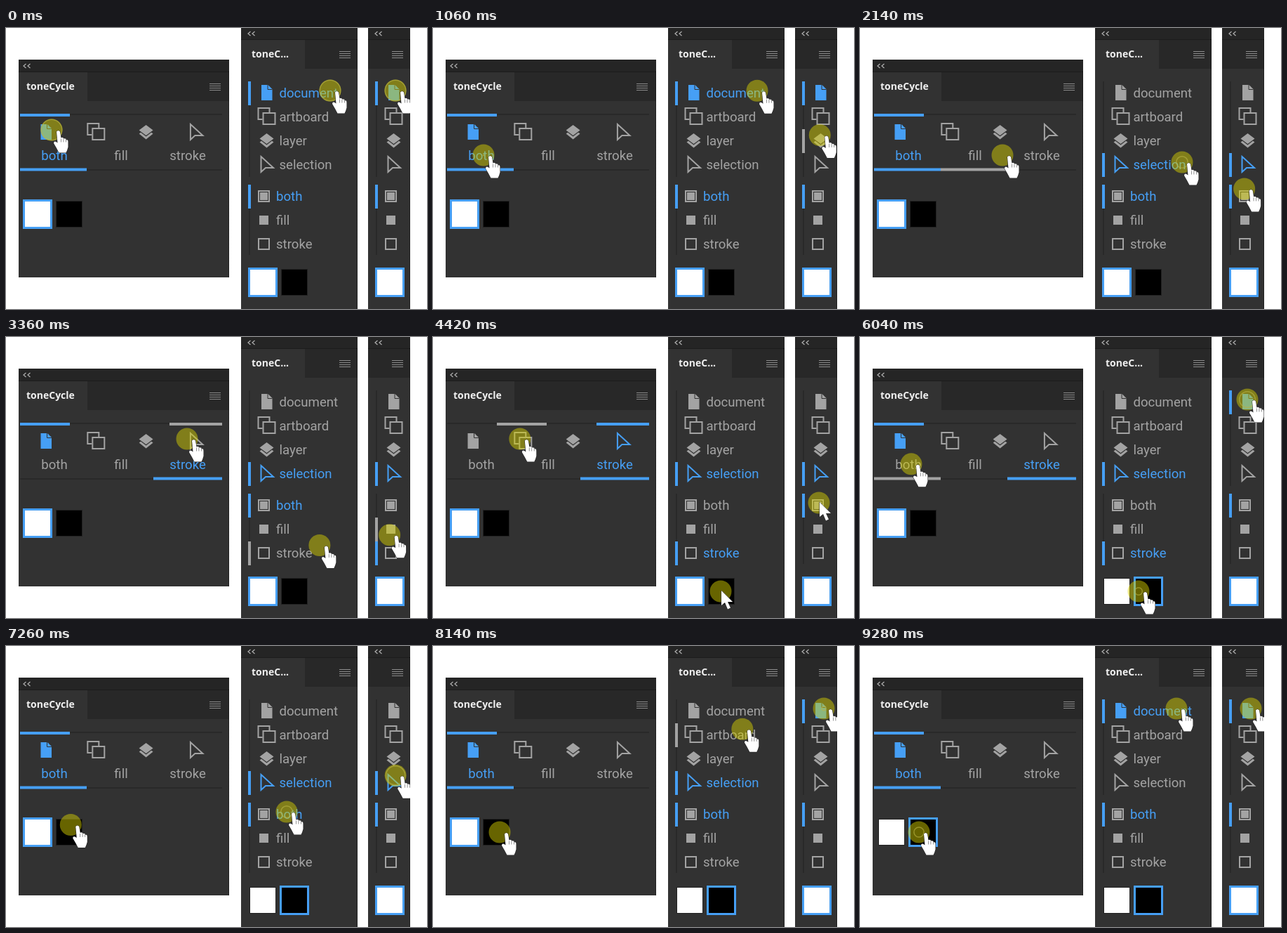
Recreate the animation shown at these times as an HTML page with a canvas. Size 600 by 400 pixels, loop 9.34 s.

```html
<!DOCTYPE html>
<html>
<head>
<meta charset="utf-8">
<style>
  html, body { margin: 0; width: 100%; height: 100%; overflow: hidden; background: #fff; }
  canvas { display: block; }
</style>
</head>
<body>
<canvas id="stage" width="600" height="400"></canvas>
<script>
const ctx = document.getElementById('stage').getContext('2d');
const LOOP = 9340, CLICK_DELAY = 150;
const BLUE = '#469ff5', GREY = '#a3a3a3', BODY = '#323232', BAR = '#282828', HEAD = '#252525', LINE = '#292929';
const LABELS = ['document', 'artboard', 'layer', 'selection', 'both', 'fill', 'stroke'];
const [DOC, SEL, BOTH, STROKE, BLACK] = [0, 3, 4, 6, 8];   // items 7 and 8 are swatches

// Each stop: arrival time, item, cursor x. The item is clicked shortly after, unless only hovered.
const panels = [
  { x: 18, y: 45, w: 300, h: 310, title: 'toneCycle', tab: 98, wide: true, stops: [
    [-400, DOC, 65], [900, BOTH, 72], [2584, STROKE, 258], [3320, SEL, 258], [4900, DOC, 62],
    [6060, BOTH, 73], [7423, BLACK, 95, 'hover'], [9010, BLACK, 84]] },
  { x: 335, y: -1, w: 166, h: 401, title: 'toneC...', tab: 91, stops: [
    [-400, DOC, 462], [1850, SEL, 459], [3498, STROKE, 446], [4300, BLACK, 410, 'hover'],
    [5800, BLACK, 397], [6970, BOTH, 400], [8450, DOC, 451]] },
  { x: 516, y: -1, w: 60, h: 401, stops: [
    [-400, DOC, 555], [1400, SEL, 549], [2670, STROKE, 545], [3757, BOTH, 550],
    [5700, DOC, 552], [6880, SEL, 555], [7944, DOC, 557]] }
];

const HAND = new Path2D('M-2.5 1Q0-2 2.5 1L4 10Q6 8 8 11Q10 10 12 13Q14 12 14 16V23Q13 27 11 31H1Q-2 25-6.5 17.5Q-6 13-1 17Z');
const ARROW = new Path2D('M0 0V21L5 17L9 26.5L13 24.5L9 16H16Z');
const PAGE = new Path2D('M-7.5-11H2L8-5V11H-7.5Z');
const FOLD = new Path2D('M1.5-11V-4.5H8');
const SHEETS = new Path2D('M0-10L10-2.5L0 5L-10-2.5ZM-10 2.5L0 10.5L10 2.5L7.5 0.8L0 6.5L-7.5 0.8Z');
const POINTER = new Path2D('M-8-11V11L-1.5 5H9.5Z');

function rect(color, x, y, w, h) {
  ctx.fillStyle = color;
  ctx.fillRect(x, y, w, h);
}

function frame(color, x, y, w, h, line) {
  ctx.strokeStyle = color;
  ctx.lineWidth = line;
  ctx.strokeRect(x + line / 2, y + line / 2, w - line, h - line);
}

function polyline(color, width, ...points) {
  ctx.strokeStyle = color;
  ctx.lineWidth = width;
  ctx.beginPath();
  points.forEach(p => ctx.lineTo(...p));
  ctx.stroke();
}

function circle(x, y, r) {
  ctx.beginPath();
  ctx.arc(x, y, r, 0, 7);
}

function text(str, x, y, color, font, align = 'left') {
  ctx.font = font;
  ctx.fillStyle = color;
  ctx.textAlign = align;
  ctx.fillText(str, x, y);
}

function icon(i, x, y, color) {
  ctx.save();
  ctx.translate(x, y);
  ctx.fillStyle = ctx.strokeStyle = color;
  ctx.lineWidth = 2;
  if (i === 0) {
    ctx.fill(PAGE);
    ctx.strokeStyle = BODY;
    ctx.lineWidth = 1;
    ctx.stroke(FOLD);
  } else if (i === 1) {
    frame(color, -13, -13, 18, 18, 2);
    rect(BODY, -6, -6, 19, 18);
    frame(color, -6, -6, 19, 18, 2);
  } else if (i === 2) {
    ctx.fill(SHEETS);
  } else if (i === 3) {
    ctx.stroke(POINTER);
  } else if (i === 5) {
    ctx.fillRect(-6, -6, 13, 13);
  } else {
    frame(color, -8, -8, 17, 17, 2);
    if (i === 4) ctx.fillRect(-5, -5, 11, 11);
  }
  ctx.restore();
}

const group = i => i < 4 ? 0 : i < 7 ? 1 : 2;

// Box of a tool or target: columns in the wide panel, rows in the others.
function cell(p, i) {
  const tool = i < 4;
  if (!p.wide) return { x: p.x, y: 76 + 34 * i + (tool ? 0 : 11), w: p.w, h: 34 };
  const k = tool ? i : i - 4, step = tool ? 71 : 95;
  const x = 20 + step * k;
  const last = i === SEL || i === STROKE;
  return { x, y: tool ? 122 : 165, w: last ? 308 - x : step, h: tool ? 43 : 39 };
}

const swatchAt = (p, k) => p.wide ? [p.x + 9 + 45 * k, 247] : [p.x + 13 + 45 * k, 344];

function stopY(p, i) {
  if (i > 6) return swatchAt(p, 0)[1] + 18;
  return cell(p, i).y + (!p.wide ? 13 : i < 4 ? 23 : 16);
}

// The longer the way, the longer the eased move that ends at each stop.
function cursorAt(p, t) {
  let x, y;
  for (const [arrive, item, sx] of p.stops) {
    const sy = stopY(p, item);
    if (x === undefined) [x, y] = [sx, sy];
    const time = 300 + 5 * Math.hypot(sx - x, sy - y);
    const u = Math.min(1, 1 + (t - arrive) / time);
    if (u <= 0) break;
    const s = u * u * (3 - 2 * u);
    x += (sx - x) * s;
    y += (sy - y) * s;
  }
  return [x, y];
}

function chrome(p) {
  const { x, y, w, h } = p, right = x + w;
  rect(BODY, x, y, w, h);
  rect(HEAD, x, y, w, 17);
  rect(BAR, x, y + 17, w, 42);
  if (p.title) {
    rect(BODY, x, y + 18, p.tab, 41);
    text(p.title, x + (p.wide ? 11 : 15), y + 43, '#f0f0f0', '700 14px "Open Sans", sans-serif');
  }
  ctx.setLineDash([1, 1]);
  polyline('#101010', 1, [x, y + 17.5], [right, y + 17.5]);
  polyline('#101010', 1, [right - 0.5, y + 17], [right - 0.5, y + h]);
  ctx.setLineDash([]);
  const left = x + (p.wide ? 7 : 10);
  for (const cx of [left, left + 6]) polyline('#b0b0b0', 1.2, [cx + 3.5, y + 6], [cx, y + 9], [cx + 3.5, y + 12]);
  for (let i = 0; i < 4; i++) rect('#8c8c8c', right - (p.wide ? 28 : 26), y + 34 + 3 * i, 16, 1);
}

function controls(p, selected, [mx, my]) {
  const left = p.x + 10;
  if (p.wide) {
    for (const y of [122, 201]) rect(LINE, 20, y, 288, 2);
  } else {
    rect(LINE, left + 1, 76, 2, 136);
    rect(LINE, left + 1, 223, 2, 100);
  }
  LABELS.forEach((name, i) => {
    const c = cell(p, i), tool = i < 4, on = selected.includes(i);
    const color = on ? BLUE : GREY;
    const hover = mx >= c.x && mx < c.x + c.w && my >= c.y && my < c.y + c.h;
    const label = (x, y, align) => text(name, x, y, color, '18.6px Roboto, sans-serif', align);
    if (on || hover) {
      if (p.wide) rect(color, c.x, tool ? 122 : 199.5, c.w, 4);
      else rect(color, left, c.y, 4, 34);
    }
    if (p.wide) {
      if (tool) icon(i, 57 + 71.3 * i, 148, color);
      else label(c.x + 49, 187.5, 'center');
    } else {
      const mid = c.y + 16;
      icon(i, left + (tool ? 26.5 : 22), mid, tool ? color : GREY);
      if (p.title) label(left + (tool ? 44.5 : 40), mid + (tool ? 6.5 : 7), 'left');
    }
  });
  ['#fff', '#000'].forEach((color, k) => {
    if (k && !p.title) return;
    const [x, y] = swatchAt(p, k);
    rect('#222', x - 1, y - 1, 38, 38);
    rect(color, x, y, 36, 36);
    if (selected[2] === 7 + k) frame(BLUE, x - 3, y - 3, 42, 42, 3);
  });
}

function cursor(p, t, [x, y], sinceClick) {
  ctx.fillStyle = 'rgba(215,208,0,.48)';
  circle(x, y, 15.5);
  ctx.fill();
  const r = sinceClick / 17;
  if (r < 15) {
    ctx.strokeStyle = 'rgba(185,180,70,.6)';
    ctx.lineWidth = 1.5;
    circle(x, y, r);
    ctx.stroke();
  }
  const arrow = !p.wide && t > 4150 && t < 4650;
  const shape = arrow ? ARROW : HAND;
  ctx.save();
  ctx.translate(x + (arrow ? 1 : 9.5), y + (arrow ? -1 : 1.5));
  ctx.strokeStyle = '#222';
  ctx.lineWidth = 1;
  ctx.fillStyle = '#fff';
  ctx.stroke(shape);
  ctx.fill(shape);
  if (!arrow) for (let dx = 3.5; dx < 11; dx += 3.5) rect('#777', dx, 11, 0.8, 5);
  ctx.restore();
}

function draw(t) {
  rect('#fff', 0, 0, 600, 400);
  for (const p of panels) {
    const selected = [DOC, BOTH, 7];
    let sinceClick = Infinity;
    for (const [arrive, item, , hover] of p.stops) {
      const since = t - arrive - CLICK_DELAY;
      if (hover || since < 0) continue;
      selected[group(item)] = item;
      sinceClick = since;
    }
    const mouse = cursorAt(p, t);
    ctx.save();
    ctx.beginPath();
    ctx.rect(p.x, p.y, p.w, p.h);
    ctx.clip();
    chrome(p);
    controls(p, selected, mouse);
    cursor(p, t, mouse, sinceClick);
    ctx.restore();
  }
}

const begin = performance.now();
function tick() {
  draw((performance.now() - begin) % LOOP);
  requestAnimationFrame(tick);
}
tick();
</script>
</body>
</html>
```
